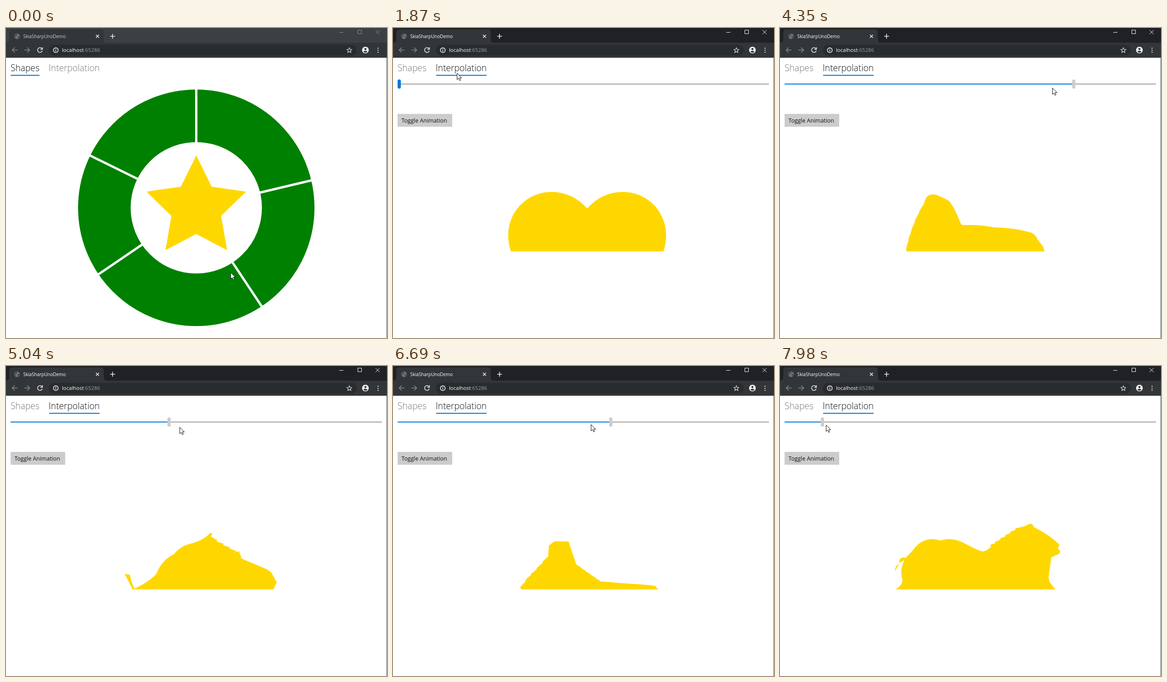
An HTML page that plays this animation: 830 px wide and 675 px high, repeating every 8000 ms.

```html
<!DOCTYPE html>
<html lang="en">
<head>
<meta charset="utf-8">
<title>Shape interpolation</title>
<style>
html, body { margin: 0; width: 100%; height: 100%; overflow: hidden; background: #fff; }
svg { display: block; width: 830px; height: 675px; }
text { font-family: "Open Sans", "Noto Sans", sans-serif; }
.tab { font-size: 19.2px; font-weight: 300; }
.line { fill: none; stroke: #e8eaed; stroke-width: 1.6; }
</style>
</head>
<body>
<svg viewBox="0 0 830 675">
  <rect width="830" height="675" fill="#fff"/>

  <!-- Browser frame -->
  <rect id="strip" width="830" height="33"/>
  <path d="M0 32Q7 32 7 25V10Q7 3 14 3H206Q213 3 213 10V25Q213 32 220 32H830V64H0Z" fill="#323639"/>
  <path d="M0 64.5H830" stroke="#606468"/>
  <circle cx="24" cy="18" r="6" fill="#72777c"/>
  <path d="M20 15q2-3 5-2l-1 3-3 1 1 3-2 1q-2-3 0-6M25 18l4-1q0 4-3 6z" fill="#43484c"/>
  <text id="title" x="37.5" y="21.5" font-size="9.9">SkiaSharpUnoDemo</text>
  <g class="line">
    <path d="M196 14.7l6.6 6.6m0-6.6l-6.6 6.6M227 18h10.5m-5.3-5.2v10.5"/>
    <path d="M25 48H13.5m5.5-5.5L13.5 48l5.5 5.5M40 48h11.5M46 42.5l5.5 5.5-5.5 5.5" stroke="#85898d"/>
    <path d="M78.3 45A5.2 5.2 0 1 0 79 49.5M79.3 42v4.5h-4.5"/>
  </g>
  <rect x="93" y="36.5" width="671" height="24" rx="12" fill="#282c2f"/>
  <g class="line">
    <circle cx="108.5" cy="48.3" r="5.2"/>
    <path d="M108.5 47.5v4m0-6.500v1.400"/>
    <path d="M748 43l1.500 3.600 3.900.3-3 2.500 1 3.900-3.400-2.100-3.400 2.100 1-3.900-3-2.500 3.900-.3z" stroke-width="1.1" style="stroke-width:1.1"/>
  </g>
  <text x="122" y="52" font-size="11.35" fill="#fff">localhost<tspan fill="#9aa0a6">:65286</tspan></text>
  <circle cx="783" cy="48" r="7.3" fill="#f1f3f4"/>
  <circle cx="783" cy="45.7" r="2.3" fill="#323639"/>
  <path d="M778.5 51.5q4.500-4 9 0-4.500 4.500-9 0" fill="#323639"/>
  <path d="M809.5 43h2v2h-2zm0 4.500h2v2h-2zm0 4.500h2v2h-2z" fill="#f1f3f4"/>
  <path id="controls" d="M726 9.500h9M766.500 4.500h8v8h-8zM805 4.500l9 9m0-9l-9 9" fill="none"/>

  <!-- Page -->
  <text id="tabA" class="tab" x="10" y="94">Shapes</text>
  <text id="tabB" class="tab" x="93" y="94">Interpolation</text>
  <rect id="mark" y="102" height="2" fill="#0078d7"/>
  <g id="shapes">
    <circle cx="414.5" cy="391.5" r="200.25" fill="none" stroke="#008000" stroke-width="114.5"/>
    <path id="gaps" stroke="#fff" stroke-width="5"/>
    <path id="star" fill="#ffd700"/>
  </g>
  <g id="morphing">
    <rect x="10" y="121.2" width="809" height="1.6" fill="#8c8c8c"/>
    <rect id="filled" x="10" y="121" height="2" fill="#0078d7"/>
    <rect id="thumb" y="112" width="7" height="20" rx="3.5"/>
    <rect x="10" y="187" width="119" height="28" fill="#ccc"/>
    <text x="18.5" y="206" font-size="12.3" fill="#111">Toggle Animation</text>
    <path id="blob" fill="#ffd700"/>
  </g>
  <path d="M829.5 65V675" stroke="#55585b"/>
  <path id="cursor" d="M.5.5V14.500L3.800 11.400 6 16.500 8.300 15.500 6.200 10.600H10.500Z" fill="#fff" stroke="#111"/>
</svg>
<script>
const LOOP = 8000, PAGE_SWITCH = 1870, GRAB = 3390, FLOOR = 486.5;
const $ = id => document.getElementById(id);
const set = (id, attrs) => {
  for (const k in attrs) $(id).setAttribute(k, attrs[k]);
};
const mix = (a, b, f) => a + (b - a) * f;

// The screen refreshes in bursts of evenly spaced steps: first, last, count
const STEPS = [
  [0, 0, 1], [580, 1590, 8], [PAGE_SWITCH, PAGE_SWITCH, 1], [2140, 2690, 5], [3270, 4200, 8],
  [4350, 5320, 8], [5470, 6410, 8], [6540, 7320, 6], [7850, 7980, 2]
].flatMap(([a, b, n]) => Array.from({ length: n }, (_, i) => mix(a, b, i / Math.max(1, n - 1))));

// Pointer before it takes the thumb: time, x, y
const APPROACH = [
  [440, 489, 532], [1440, 134, 94], [1590, 139, 98],
  [2000, 139, 98], [2410, 40, 170], [2690, 17, 134], [3270, 16, 123]];

// Thumb dragged back and forth: time, x
const DRAG = [
  [3270, 13.5], [3390, 175], [4350, 640], [4760, 91], [5040, 354], [6000, 745.5],
  [6130, 757], [6410, 640], [6690, 482], [7000, 91], [7320, 634], [7850, 91], [7980, 92.5]];

const HEART = `M257 ${FLOOR}Q251 470 251 451C251 399 293 357 345 357Q391 357 423 393
  Q455 357 501 357C553 357 595 399 595 451Q595 470 589 ${FLOOR}`;

// Ragged edge of n teeth from one point to another
function teeth(x1, y1, x2, y2, n, depth = 3) {
  const length = Math.hypot(x2 - x1, y2 - y1);
  const inX = (y1 - y2) / length * depth, inY = (x2 - x1) / length * depth;
  let d = `L${x1} ${y1}`;
  for (let i = 1; i <= n; i++) {
    const x = mix(x1, x2, i / n), y = mix(y1, y2, i / n);
    const tip = `L${x} ${y}`, notch = `L${x + inX} ${y + inY}`;
    d += y2 < y1 ? notch + tip : tip + notch;
  }
  return d;
}

// Outlines by thumb position, from bottom left over the top to bottom right
const OUTLINES = [
  [92.5, `M251 ${FLOOR}Q265 480 267 466Q260 444 271 423L261 428 251 446Q249 438 260 430Q259 414 273 418
    Q285 407 295 394Q312 376 335 377L350 380Q375 372 402 386Q425 399 441 404Q452 402 460 393
    ${teeth(457, 390, 512, 354, 5)}L536 348Q549 338 553 351Q590 369 609 390L605 397Q616 407 603 411
    L591 417 585 460 587 470 600 ${FLOOR}`],
  [354, `M276 ${FLOOR}L258 452 270 455Q272 472 280 485Q307 473 327 454Q339 423 366 410
    Q374 400 385 393C400 385 425 385 445 363L450 364${teeth(447, 371, 502, 402, 4)}
    L508 403 514 419 568 442 578 449 590 471 583 ${FLOOR}`],
  [482, `M280 ${FLOOR}${teeth(277, 482, 339, 409, 5, 2)}L340 388 352 379 383 381
    ${teeth(397, 436, 450, 473, 5, 1)}L570 479 577 ${FLOOR}`],
  [745.5, `M273 ${FLOOR}Q270 405 304 350Q314 346 324 348Q371 373 393 424L398 425
    Q440 408 480 408Q527 408 565 426Q569 431 571 440L570 447Q575 465 576 ${FLOOR}`]
].map(([x, d]) => [x, ...sample(d)]);

// Evenly spaced points along a path, flattened to x, y, x, y...
function sample(d, count = 500) {
  const path = document.createElementNS('http://www.w3.org/2000/svg', 'path');
  path.setAttribute('d', d);
  const length = path.getTotalLength(), out = [];
  for (let i = 0; i <= count; i++) {
    const p = path.getPointAtLength(length * i / count);
    out.push(p.x, p.y);
  }
  return out;
}

// Linear interpolation of rows keyed by their first entry
function at(rows, key) {
  let i = rows.findIndex(r => r[0] >= key);
  if (i < 0) i = rows.length - 1;
  const b = rows[i], a = rows[Math.max(0, i - 1)];
  const f = a === b ? 1 : Math.min(1, (key - a[0]) / (b[0] - a[0]));
  return b.slice(1).map((v, k) => mix(a[k + 1], v, f));
}

// The thumb trails the pointer by 40 ms while the hand sways up and down
function pointer(t) {
  if (t < GRAB) return at(APPROACH, t);
  return [at(DRAG, t + 40)[0] + 7, 129.5 + 4 * Math.cos((t - 5300) / 605)];
}

const polar = (deg, r) => {
  const a = deg * Math.PI / 180;
  return `${414.5 + r * Math.sin(a)} ${391.5 - r * Math.cos(a)}`;
};
set('gaps', { d: [0, 76.6, 146.4, 235.8, 296.2].map(a => `M${polar(a, 140)}L${polar(a, 260)}`).join('') });
set('star', { d: 'M' + Array.from({ length: 10 }, (_, i) => polar(i * 36, i % 2 ? 57 : 114)).join('L') + 'Z' });

function draw(time) {
  const t = STEPS.findLast(s => s <= time + 30);
  const second = time >= PAGE_SWITCH, dragging = t >= GRAB;

  set('strip', { fill: second ? '#202124' : '#3c4043' });
  set('title', { fill: second ? '#fff' : '#cbced1' });
  set('controls', { stroke: second ? '#fff' : '#909396' });
  set('tabA', { fill: second ? '#777' : '#111' });
  set('tabB', { fill: second ? '#111' : '#777' });
  set('mark', second ? { x: 94, width: 110 } : { x: 10, width: 63 });
  set('shapes', { display: second ? 'none' : 'inline' });
  set('morphing', { display: second ? 'inline' : 'none' });

  const [x] = at(DRAG, t);
  set('filled', { width: dragging ? x - 10 : 0 });
  set('thumb', { x: x - 3.5, fill: dragging ? '#ccc' : '#0078d7' });
  set('blob', { d: dragging ? 'M' + at(OUTLINES, x).map(v => v.toFixed(2)).join(' ') + 'Z' : HEART });
  set('cursor', { transform: `translate(${pointer(t).map(Math.round).join(' ')})` });
}

function tick() {
  draw(performance.now() % LOOP);
  requestAnimationFrame(tick);
}
tick();
</script>
</body>
</html>
```
